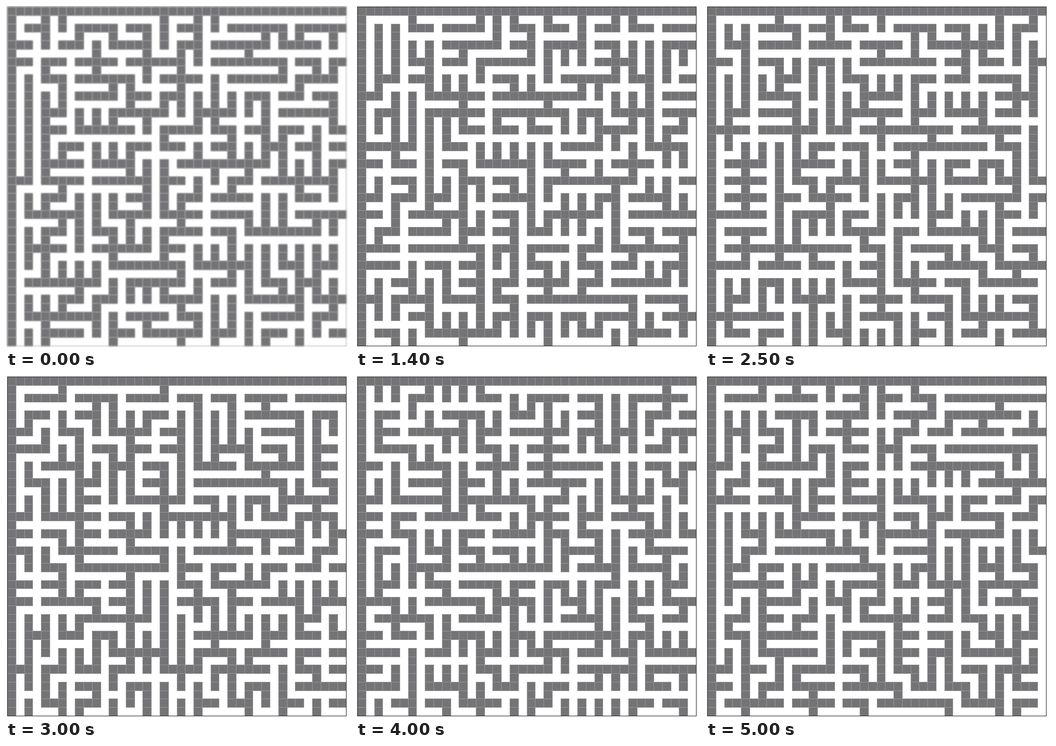
Write an HTML page with a canvas that moves like this. It is 600 px wide and 596 px high and loops after 5500 ms.

```html
<!DOCTYPE html>
<html lang="en">
<head>
<meta charset="utf-8">
<title>Random mazes</title>
<style>
  html, body { margin: 0; height: 100%; overflow: hidden; background: #fff; }
  canvas { display: block; }
</style>
</head>
<body>
<canvas id="stage" width="600" height="596"></canvas>
<script>
const N = 40;
const LEFT = 2, TOP = 1, CELL = 14.775;
const WALL = '#747376', SEAM = '#949396';
const LOOP = 5500, SOFT_UNTIL = 100;
const STARTS = [0, 500, 1000, 1400, 1900, 2500, 3000, 3500, 4000, 4500, 5000];
const STEPS = [[2, 0], [-2, 0], [0, 2], [0, -2]];
const ctx = document.getElementById('stage').getContext('2d');

function seededRandom(seed) {
  return () => {
    seed = (seed + 0x6D2B79F5) | 0;
    let t = Math.imul(seed ^ (seed >>> 15), 1 | seed);
    t = (t + Math.imul(t ^ (t >>> 7), 61 | t)) ^ t;
    return ((t ^ (t >>> 14)) >>> 0) / 4294967296;
  };
}

// Prim's algorithm from the top left: each frontier cell joins a random open neighbour
function buildMaze(seed) {
  const random = seededRandom(seed);
  const wall = Array.from({ length: N }, () => Array(N).fill(true));
  const frontier = [], queued = new Set();
  const pick = list => Math.floor(random() * list.length);
  const neighbours = (x, y) => STEPS
    .map(([dx, dy]) => [x + dx, y + dy])
    .filter(([nx, ny]) => nx > 0 && ny > 0 && nx < N && ny < N);

  const openCell = (x, y) => {
    wall[y][x] = false;
    for (const [nx, ny] of neighbours(x, y)) {
      const key = ny * N + nx;
      if (!wall[ny][nx] || queued.has(key)) continue;
      queued.add(key);
      frontier.push([nx, ny]);
    }
  };

  openCell(1, 1);
  while (frontier.length) {
    const [[x, y]] = frontier.splice(pick(frontier), 1);
    const joined = neighbours(x, y).filter(([nx, ny]) => !wall[ny][nx]);
    const [nx, ny] = joined[pick(joined)];
    wall[(y + ny) / 2][(x + nx) / 2] = false;
    openCell(x, y);
  }
  return wall;
}

const edgeX = column => Math.round(LEFT + column * CELL);
const edgeY = row => Math.round(TOP + row * CELL);

function drawCell(column, row) {
  const x = edgeX(column), y = edgeY(row);
  const width = edgeX(column + 1) - x, height = edgeY(row + 1) - y;
  ctx.fillStyle = SEAM;
  ctx.fillRect(x, y, width + 1, height + 1);
  ctx.fillStyle = WALL;
  ctx.fillRect(x + 1, y + 1, width - 1, height - 1);
}

function draw(maze, soft) {
  ctx.filter = 'none';
  ctx.fillStyle = '#fff';
  ctx.fillRect(0, 0, 600, 596);
  if (soft) ctx.filter = 'blur(1px)';
  maze.forEach((cells, row) => cells.forEach((isWall, column) => {
    if (isWall) drawCell(column, row);
  }));
  ctx.strokeStyle = soft ? '#aaa' : '#333';
  ctx.strokeRect(LEFT + 0.5, TOP + 0.5, N * CELL, N * CELL);
}

const mazes = STARTS.map(start => buildMaze(start + 1));
let shown = '';

function frame() {
  const t = (performance.now() - origin) % LOOP;
  const index = STARTS.findLastIndex(start => start <= t);
  const soft = t < SOFT_UNTIL;
  const state = index + ':' + soft;
  if (state !== shown) {
    draw(mazes[index], soft);
    shown = state;
  }
  requestAnimationFrame(frame);
}

const origin = performance.now();
frame();
</script>
</body>
</html>
```
